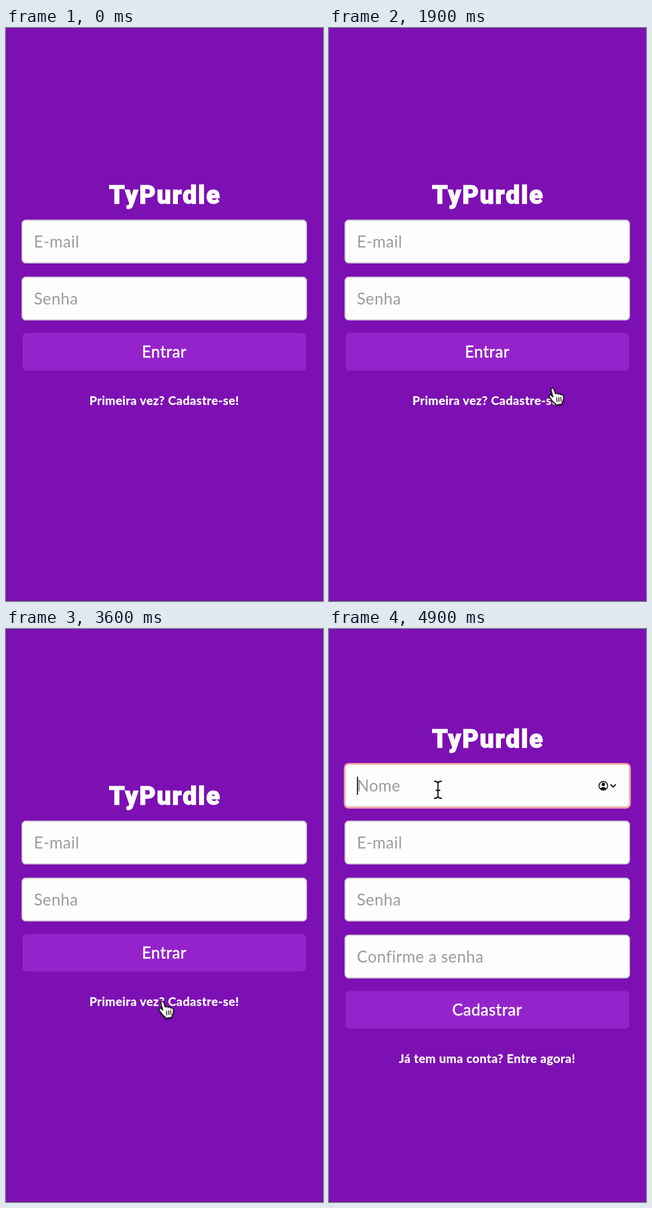
Write an HTML page that moves like this. It is 557 px wide and 1005 px high and loops after 5000 ms.

```html
<!DOCTYPE html>
<html lang="pt-BR">
<head>
<meta charset="utf-8">
<title>Login</title>
<style>
  html, body { margin: 0; width: 100%; height: 100%; overflow: hidden; background: #7d10b3; }
  svg { display: block; width: 100%; height: 100%; }

  .title { font: 900 44px Roboto, sans-serif; letter-spacing: 2.2px; stroke-width: 1.4px; }
  .hint, .action { font: 400 28px Lato, sans-serif; letter-spacing: .5px; }
  .link { font: 700 21.3px Lato, sans-serif; letter-spacing: .5px; stroke-width: .4px; }
  .hint { fill: #9c9c9c; }
  .title, .action, .link { fill: #fff; stroke: #fff; text-anchor: middle; }
  .action { stroke-width: .6px; }

  /* screens */
  .login, .signup, .focus, .arrow, .hand, .beam { animation: 5s step-end infinite; }
  .login { animation-name: login; }
  .signup { animation-name: signup; }
  .focus { animation-name: focus; }
  @keyframes login { 0% { visibility: visible } 74%, 100% { visibility: hidden } }
  @keyframes signup { 0% { visibility: hidden } 74%, 100% { visibility: visible } }
  @keyframes focus { 0% { visibility: hidden } 96%, 100% { visibility: visible } }

  /* pointer shapes */
  .arrow { animation-name: arrow; }
  .hand { animation-name: hand; }
  .beam { animation-name: beam; }
  @keyframes arrow {
    0%, 38%, 76%, 100% { visibility: hidden }
    32%, 74% { visibility: visible }
  }
  @keyframes hand { 0%, 74%, 100% { visibility: hidden } 38% { visibility: visible } }
  @keyframes beam { 0% { visibility: hidden } 76%, 100% { visibility: visible } }

  /* pointer path, sampled ten times a second */
  .pointer { animation: path 5s step-end infinite; }
  @keyframes path {
    0% { transform: translate(505px, 598px) }
    32% { transform: translate(505px, 598px); animation-timing-function: steps(3) }
    38% { transform: translate(392.8px, 632px); animation-timing-function: steps(2) }
    42% { transform: translate(368px, 633px); animation-timing-function: steps(4) }
    50% { transform: translate(321px, 643.5px) }
    52% { transform: translate(294px, 649px) }
    54% { transform: translate(298px, 648px) }
    56% { transform: translate(300px, 650px) }
    58% { transform: translate(300px, 650px); animation-timing-function: steps(4) }
    66% { transform: translate(274.8px, 653.5px) }
    74% { transform: translate(277px, 649px) }
    76% { transform: translate(282px, 595px); animation-timing-function: steps(3) }
    82% { transform: translate(306px, 345px) }
    84% { transform: translate(300px, 300px); animation-timing-function: steps(3) }
    90%, 100% { transform: translate(191.5px, 282px) }
  }
</style>
</head>
<body>
<svg viewBox="0 0 557 1005" preserveAspectRatio="none">
  <defs>
    <rect id="field" x="28.1" y="37" width="500" height="75" rx="6.5" fill="#fefefe" stroke="#c9c2cd" stroke-width="1.8"/>
    <rect id="button" x="29" y="35" width="498.5" height="66" rx="7" fill="#9523cb"/>
    <path id="ibeam" d="M-6-15Q0-15 0-10Q0-15 6-15M0-10V10M-6 15Q0 15 0 10Q0 15 6 15M-3 1H3"/>
    <filter id="shade" x="-30%" y="-30%" width="170%" height="170%">
      <feDropShadow dx="0" dy="1.5" stdDeviation="1.2" flood-color="#000" flood-opacity=".45"/>
    </filter>
  </defs>

  <rect width="557" height="1005" fill="#7d10b3"/>
  <rect y="1004" width="557" height="1" fill="#6b1296"/>

  <use href="#field" y="300"/>
  <text class="hint" x="49" y="385">E-mail</text>
  <use href="#field" y="400"/>
  <text class="hint" x="49" y="485">Senha</text>

  <g class="login">
    <text class="title" x="279.5" y="308">TyPurdle</text>
    <use href="#button" y="500"/>
    <text class="action" x="278" y="578">Entrar</text>
    <text class="link" x="278" y="661">Primeira vez? Cadastre-se!</text>
  </g>

  <g class="signup">
    <text class="title" x="279.5" y="208">TyPurdle</text>
    <use href="#field" y="200"/>
    <text class="hint" x="49" y="285">Nome</text>
    <use href="#field" y="500"/>
    <text class="hint" x="49" y="585">Confirme a senha</text>
    <use href="#button" y="600"/>
    <text class="action" x="278" y="678">Cadastrar</text>
    <text class="link" x="278" y="761">Já tem uma conta? Entre agora!</text>
  </g>

  <g class="focus" fill="none">
    <rect x="27.5" y="236.5" width="501.5" height="77" rx="7" stroke="#f7a3a6" stroke-width="2.8"/>
    <path d="M50 259V291" stroke="#111" stroke-width="1.8"/>
    <circle cx="482" cy="275" r="7.6" stroke="#111" stroke-width="1.7"/>
    <circle cx="482" cy="272.6" r="3" fill="#111"/>
    <path d="M476.5 279.5Q482 274.5 487.5 279.5Q482 284.5 476.5 279.5Z" fill="#111"/>
    <path d="M494.5 272.5L499.2 277L504 272.5" stroke="#111" stroke-width="2"/>
  </g>

  <g class="pointer" stroke-linejoin="round" stroke-linecap="round">
    <path class="arrow" filter="url(#shade)" fill="#0c0c0c" stroke="#fff" stroke-width="2"
      d="M0 0V26.5L6.3 20.8L11 32L15.8 30L11.2 19.2L19.3 18.8Z"/>
    <g class="hand" filter="url(#shade)">
      <path fill="#fff" stroke="#111" stroke-width="1.8"
        d="M-2.8 2.8C-3.2-.8 1.4-1.4 2.4 1.6L5 9.5C6.6 8 9.2 8.4 9.9 10.2C11.8 8.8 14 9.6 14.6 11.4C16.8 10.4 18.8 11.6 19.2 14C20 19 19 21.5 17.2 24L17 27.5L6 29.5L5 27C.5 24-3 19-5.6 14.6C-6.8 11.4-3.6 10.6-1.6 12.6L.6 15Z"/>
      <path fill="none" stroke="#111" stroke-width="1.5" d="M7 16.5L7.8 23.5M10.8 16L11.4 23M14.4 15.5L14.8 22.5"/>
    </g>
    <g class="beam" fill="none">
      <use href="#ibeam" stroke="#fff" stroke-width="4"/>
      <use href="#ibeam" stroke="#1a1a1a" stroke-width="2.3"/>
    </g>
  </g>
</svg>
</body>
</html>
```
